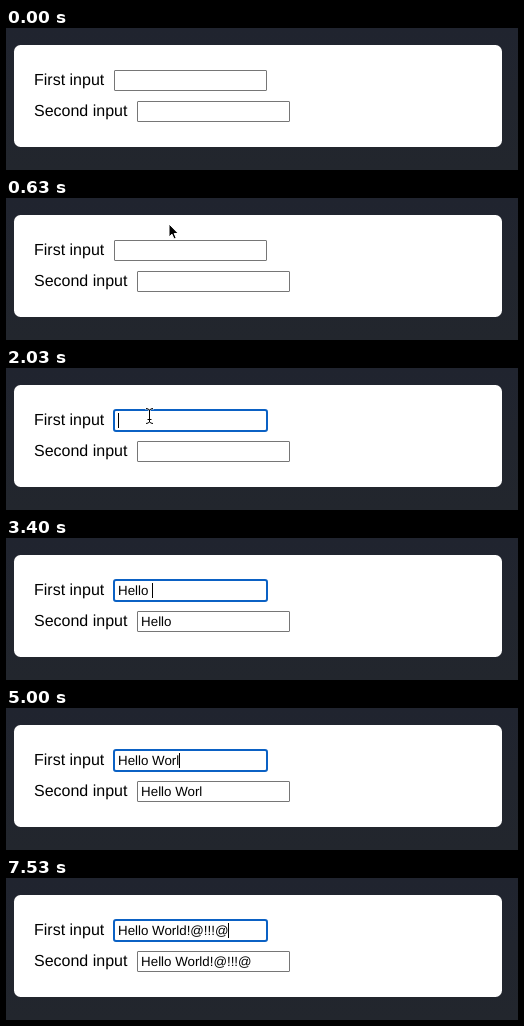
Recreate the animation shown at these times as an HTML page. Size 512 px wide and 142 px high, loop 8 s.

```html
<!DOCTYPE html>
<html lang="en">
<head>
<meta charset="utf-8">
<title>Mirrored inputs</title>
<style>
  html, body { margin: 0; width: 100%; height: 100%; overflow: hidden; background: #22262e; }
  svg { display: block; width: 100vw; height: 100vh; }
  text {
    font: 16px "Liberation Sans", Arial, sans-serif;
    white-space: pre;
    text-rendering: geometricPrecision;
  }
  .value { font-size: 13.333px; }
  .field { fill: #fff; stroke: #767676; }
  .field.hover { stroke: #404040; }
  .field.focus { stroke: #0b61c4; stroke-width: 2; }
</style>
</head>
<body>
<svg viewBox="0 0 512 142">
  <defs>
    <linearGradient id="backdrop" x2="0" y2="1">
      <stop stop-color="#20242f"/>
      <stop offset="1" stop-color="#22262d"/>
    </linearGradient>
  </defs>
  <rect width="512" height="142" fill="url(#backdrop)"/>
  <rect x="8" y="17" width="488" height="102" rx="6.5" fill="#fff"/>

  <text x="28" y="57">First input</text>
  <rect id="first" class="field"/>
  <text id="firstValue" class="value" x="112" y="57"></text>
  <rect id="caret" y="45" width="1" height="15"/>

  <text x="28" y="88">Second input</text>
  <rect id="second" class="field"/>
  <text id="secondValue" class="value" x="135.1" y="88"></text>

  <path id="arrow" d="M0 0V13L3 10.2 5 15 7.2 14 5.2 9.5H9.3Z" stroke="#fff"/>
  <g id="beam" fill="none" stroke-linecap="square">
    <path d="M-3 -7.5Q0 -7.5 .5 -5.5Q1 -7.5 4 -7.5M.5 -5.5V5.5M-3 7.5Q0 7.5 .5 5.5Q1 7.5 4 7.5M-1.5 3.5H2.5" stroke="#fff" stroke-width="2" opacity=".8"/>
    <path d="M-2.5 -7.5Q0 -7.5 .5 -5.5Q1 -7.5 3.5 -7.5M.5 -5.5V5.5M-2.5 7.5Q0 7.5 .5 5.5Q1 7.5 3.5 7.5M-1 3.5H2" stroke="#000"/>
  </g>
</svg>
<script>
const LOOP = 8000, FOCUS = 1030, HIDE_POINTER = 2200;
const message = "Hello World!@!!!@";
const keyTimes = [2200, 2400, 2500, 2700, 2900, 3400, 3430, 3660, 3830, 4000,
  5030, 6030, 6030, 6260, 6760, 6960, 7530];
const caretOff = [[1560, 2030], [4500, 5000], [5560, 6030], [7460, 7530]];
const pointerMoves = [
  { start: 160, end: 360, from: [202, 99], to: [216, -18], ease: p => p },
  { start: 500, end: 860, hold: HIDE_POINTER, from: [192, -6], to: [143, 48], ease: p => 1 - (1 - p) ** 2 },
];
const fields = {
  first: { x: 108, y: 42 },
  second: { x: 131, y: 73 },
};
const size = { width: 153, height: 21 };

const $ = id => document.getElementById(id);
const show = (node, visible) => node.setAttribute("visibility", visible ? "visible" : "hidden");

function setBox(id, inset) {
  const { x, y } = fields[id];
  const box = { x: x + inset, y: y + inset, width: size.width - 2 * inset,
    height: size.height - 2 * inset, rx: inset ? 0.5 : 2 };
  for (const key in box) $(id).setAttribute(key, box[key]);
}

function pointerAt(t) {
  const move = pointerMoves.find(m => t >= m.start && t < (m.hold || m.end));
  if (!move) return null;
  const p = move.ease(Math.min(1, (t - move.start) / (move.end - move.start)));
  return move.from.map((v, i) => Math.round(v + (move.to[i] - v) * p));
}

function isInside(point, { x, y }) {
  return !!point && point[0] >= x && point[0] < x + size.width
    && point[1] >= y && point[1] < y + size.height;
}

function draw(t) {
  const focused = t >= FOCUS;
  const pointer = pointerAt(t);
  let hovering = false;

  for (const id in fields) {
    const hover = isInside(pointer, fields[id]);
    const focus = focused && id === "first";
    hovering = hovering || hover;
    $(id).classList.toggle("hover", hover);
    $(id).classList.toggle("focus", focus);
    setBox(id, focus ? 0 : 0.5);
  }

  for (const id of ["arrow", "beam"]) {
    show($(id), pointer && hovering === (id === "beam"));
    if (pointer) $(id).setAttribute("transform", `translate(${pointer})`);
  }

  const typed = message.slice(0, keyTimes.filter(time => time <= t).length);
  $("firstValue").textContent = $("secondValue").textContent = typed;
  const width = typed ? $("firstValue").getComputedTextLength() : 0;
  $("caret").setAttribute("x", Math.floor(112 + width));
  show($("caret"), focused && !caretOff.some(([from, to]) => t >= from && t < to));
}

const begin = performance.now();
function tick() {
  draw((performance.now() - begin) % LOOP);
  requestAnimationFrame(tick);
}
tick();
</script>
</body>
</html>
```
